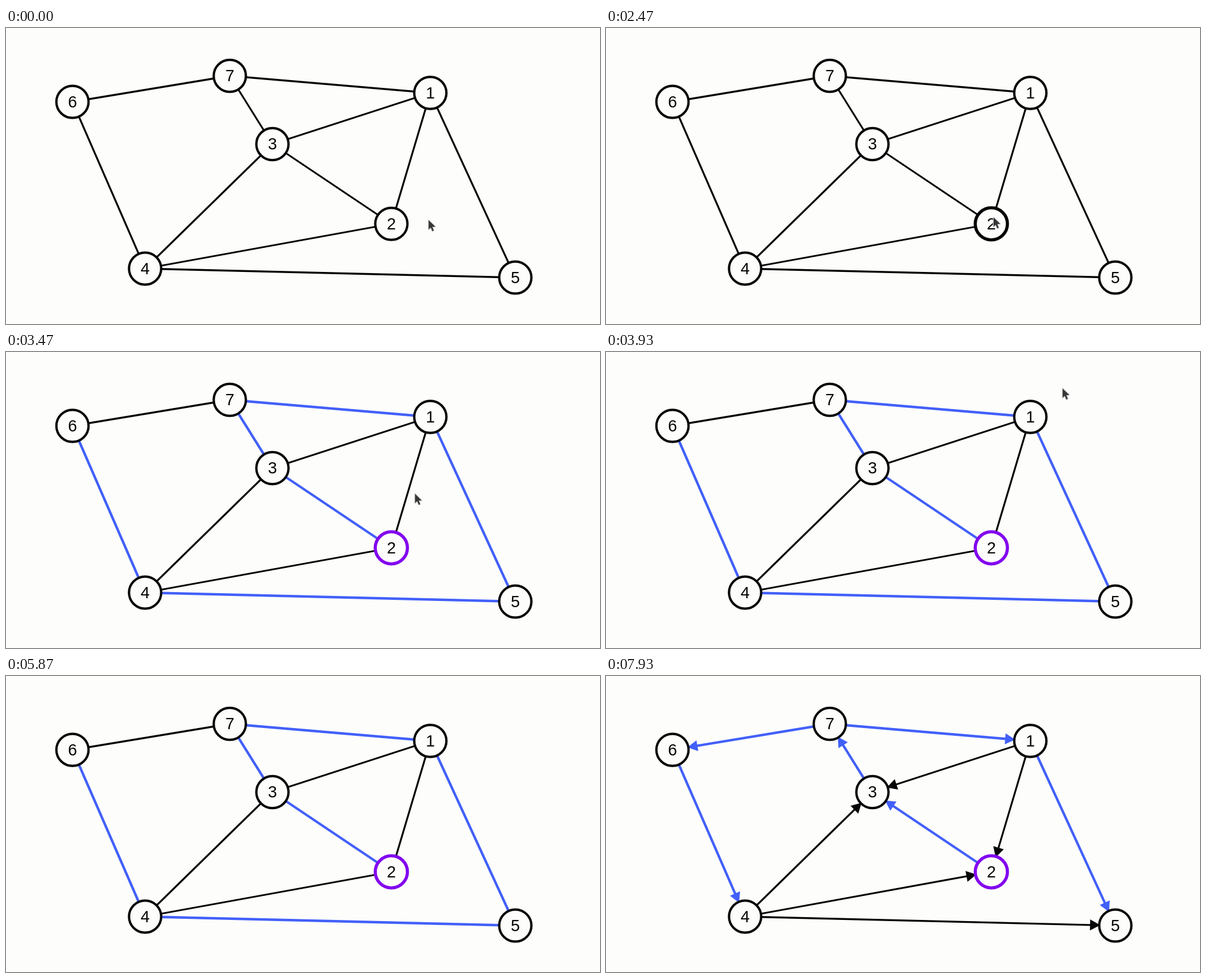
Recreate the animation shown at these times as an HTML page with a canvas. Size 1059 px wide and 529 px high, loop 8000 ms.

```html
<!DOCTYPE html>
<html lang="en">
<head>
<meta charset="utf-8">
<title>Graph traversal</title>
<style>
  html, body { margin: 0; width: 100%; height: 100%; overflow: hidden; background: #fdfdfb; }
  canvas { display: block; }
</style>
</head>
<body>
<canvas id="stage" width="1059" height="529"></canvas>
<script>
const ctx = document.getElementById('stage').getContext('2d');
const LOOP = 8000;
const SELECT_AT = 2730;
const DIRECT_AT = 6130;
const PAPER = '#fdfdfb', BLACK = '#050505', BLUE = '#4260fa', PURPLE = '#8204ee';
const ROOT = 2;

const nodes = {
  1: [756.5, 116], 2: [687, 350], 3: [475, 207.5], 4: [248, 430],
  5: [908, 446], 6: [118.5, 132], 7: [399, 85.5]
};

// Each pair reads from -> to once the graph becomes directed.
const edges = ['76', '71', '37', '13', '12', '15', '23', '43', '42', '45', '64'];
const undirectedTree = new Set(['71', '37', '15', '23', '45', '64']);
const directedTree = new Set(['71', '37', '15', '23', '76', '64']);

// Pointer stops: time, x, y.
const pointerPath = [
  [0, 752.5, 342], [1450, 752.5, 342], [2270, 690, 337], [3200, 690, 337],
  [3930, 813, 64], [4130, 831, 15]
];

function pointerAt(t) {
  if (t > 4180) return null;
  for (let i = 1; i < pointerPath.length; i++) {
    const [t0, x0, y0] = pointerPath[i - 1];
    const [t1, x1, y1] = pointerPath[i];
    if (t > t1) continue;
    const u = (t - t0) / (t1 - t0);
    const k = i === pointerPath.length - 1 ? u : u * u * (3 - 2 * u);
    return [x0 + (x1 - x0) * k, y0 + (y1 - y0) * k];
  }
  return pointerPath[pointerPath.length - 1].slice(1);
}

function drawEdge(name, inTree, directed) {
  const [x0, y0] = nodes[name[0]];
  const [x1, y1] = nodes[name[1]];
  const length = Math.hypot(x1 - x0, y1 - y0);
  const tip = length - 27;
  ctx.save();
  ctx.translate(x0, y0);
  ctx.rotate(Math.atan2(y1 - y0, x1 - x0));
  ctx.strokeStyle = ctx.fillStyle = inTree ? BLUE : BLACK;
  ctx.lineWidth = inTree ? 4.4 : 3.3;
  ctx.beginPath();
  ctx.moveTo(0, 0);
  ctx.lineTo(directed ? tip - 12 : length, 0);
  ctx.stroke();
  if (directed) {
    ctx.beginPath();
    ctx.moveTo(tip, 0);
    ctx.lineTo(tip - 18, -9.8);
    ctx.lineTo(tip - 18, 9.8);
    ctx.fill();
  }
  ctx.restore();
}

function drawNode(label, selected, pointer) {
  const [x, y] = nodes[label];
  const hovered = pointer && Math.hypot(pointer[0] - x, pointer[1] - y) < 30;
  ctx.beginPath();
  ctx.arc(x, y, 28.7, 0, Math.PI * 2);
  ctx.fillStyle = PAPER;
  ctx.fill();
  ctx.strokeStyle = selected ? PURPLE : BLACK;
  ctx.lineWidth = selected || hovered ? 5.6 : 4.2;
  ctx.stroke();
  ctx.fillStyle = BLACK;
  ctx.fillText(label, x, y + 9.5);
}

function drawPointer([x, y]) {
  ctx.save();
  ctx.translate(x + 1, y + 1.5);
  ctx.beginPath();
  ctx.moveTo(0, 0);
  ctx.lineTo(0, 16.5);
  ctx.lineTo(3.8, 13);
  ctx.lineTo(6.6, 19.5);
  ctx.lineTo(9.2, 18.4);
  ctx.lineTo(6.5, 12);
  ctx.lineTo(11.8, 11.6);
  ctx.closePath();
  ctx.lineJoin = 'round';
  ctx.lineWidth = 2.4;
  ctx.strokeStyle = '#d4d4d4';
  ctx.stroke();
  ctx.fillStyle = '#363636';
  ctx.fill();
  ctx.restore();
}

function render(t) {
  const selected = t >= SELECT_AT;
  const directed = t >= DIRECT_AT;
  const tree = directed ? directedTree : undirectedTree;
  const pointer = pointerAt(t);
  ctx.fillStyle = PAPER;
  ctx.fillRect(0, 0, 1059, 529);
  for (const name of edges) drawEdge(name, selected && tree.has(name), directed);
  ctx.font = '29px "Liberation Sans", Arial, sans-serif';
  ctx.textAlign = 'center';
  for (const label in nodes) drawNode(label, selected && +label === ROOT, pointer);
  if (pointer) drawPointer(pointer);
}

const start = performance.now();
function tick() {
  render((performance.now() - start) % LOOP);
  requestAnimationFrame(tick);
}
tick();
</script>
</body>
</html>
```
